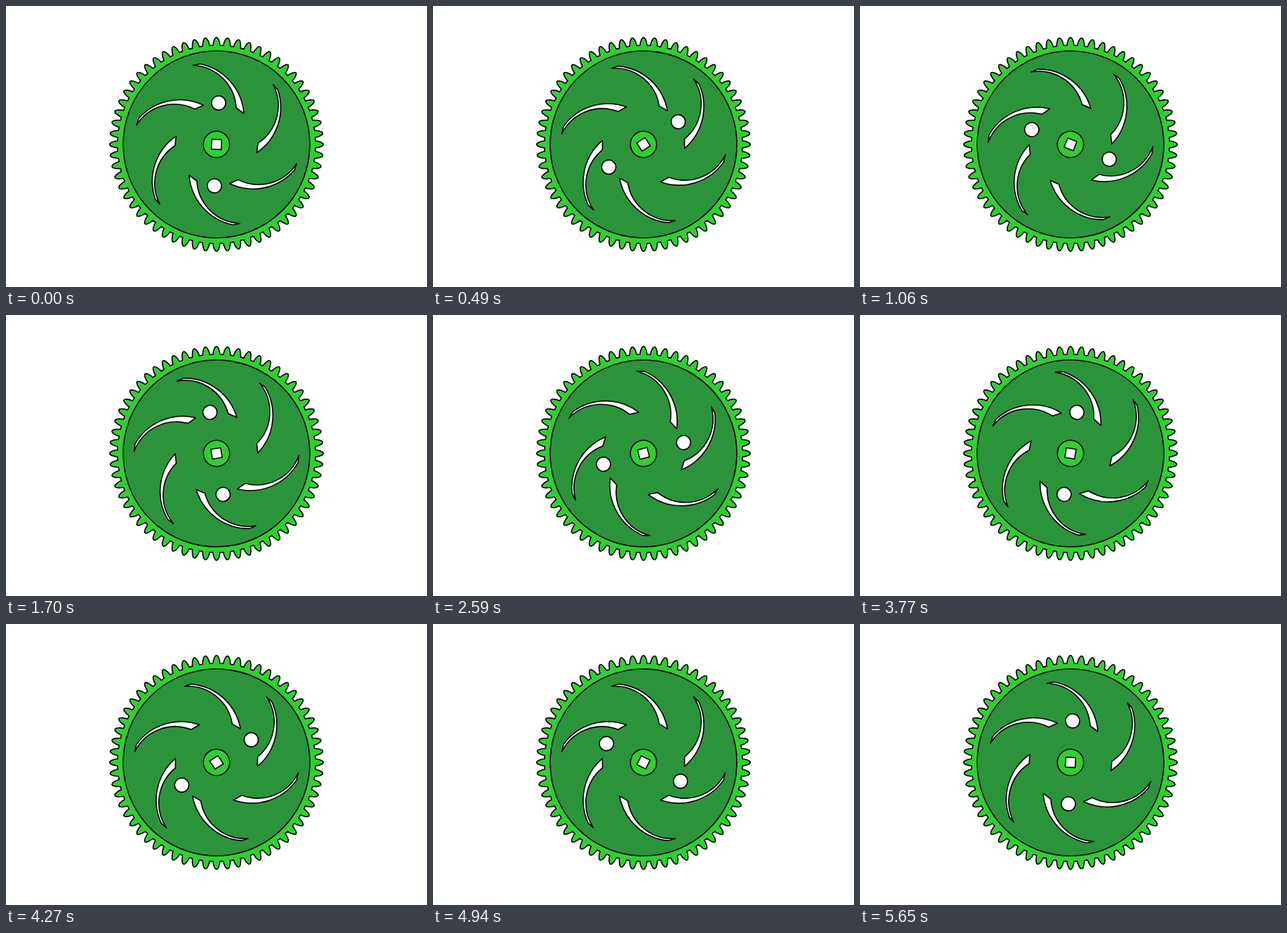
Animation of 600 by 400 pixels, one loop 5680 ms. Source, as an HTML page:

```html
<!DOCTYPE html>
<html lang="en">
<head>
<meta charset="utf-8">
<title>Spur gear</title>
<style>
  html, body { margin: 0; width: 100%; height: 100%; overflow: hidden; background: #fff; }
  svg { display: block; width: 600px; height: 400px; }
</style>
</head>
<body>
<svg viewBox="0 0 600 400">
  <g transform="translate(300 197)" fill="#fff" stroke="#000" stroke-width="1.6" stroke-linejoin="round">
    <g id="wheel">
      <path id="rim" fill="#32cd32"/>
      <circle r="133" fill="#2b943b"/>
      <g id="slots"></g>
      <circle r="18.7" fill="#32cd32"/>
      <g transform="rotate(2.9)">
        <circle cy="-59.1" r="10.1"/>
        <circle cy="59.1" r="10.1"/>
        <rect x="-7" y="-7" width="14" height="14"/>
      </g>
    </g>
  </g>
</svg>
<script>
const LOOP = 5680, TEETH = 60, STEP = 360 / TEETH, JUMPS = 90;
const $ = id => document.getElementById(id);

// Turns points given for the upright tooth to tooth i.
const turn = (points, i) => points.map(([x, y]) => {
  const a = i * STEP * Math.PI / 180, c = Math.cos(a), s = Math.sin(a);
  return (x * c - y * s).toFixed(2) + ',' + (x * s + y * c).toFixed(2);
});

let outline = '';
for (let i = 0; i < TEETH; i++) {
  const [start, ...curve] = turn([
    [-5, -141], [-4.6, -146], [-2.5, -152.3], [0, -152.3],
    [2.5, -152.3], [4.6, -146], [5, -141]
  ], i);
  outline += (i ? 'L' : 'M') + start + 'C' + curve.join(' ');
}
$('rim').setAttribute('d', outline + 'Z');

for (let i = 0; i < 6; i++) {
  $('slots').innerHTML += `<path transform="rotate(${i * 60})"
    d="M-33.5-112.5L-23.5-114.5A78 78 0 0 1 39-44L28-52A64 64 0 0 0-33.5-112.5Z"/>`;
}

// The wheel jumps one tooth at a time, a little faster just after the start.
function jumpsAt(t) {
  const lead = 2.03 * (1 - Math.exp(-t / 180));
  return Math.min(JUMPS, Math.floor(t / 63.75 + lead));
}

function draw() {
  const angle = jumpsAt(performance.now() % LOOP) * STEP;
  $('wheel').setAttribute('transform', `rotate(${angle})`);
  requestAnimationFrame(draw);
}
draw();
</script>
</body>
</html>
```
